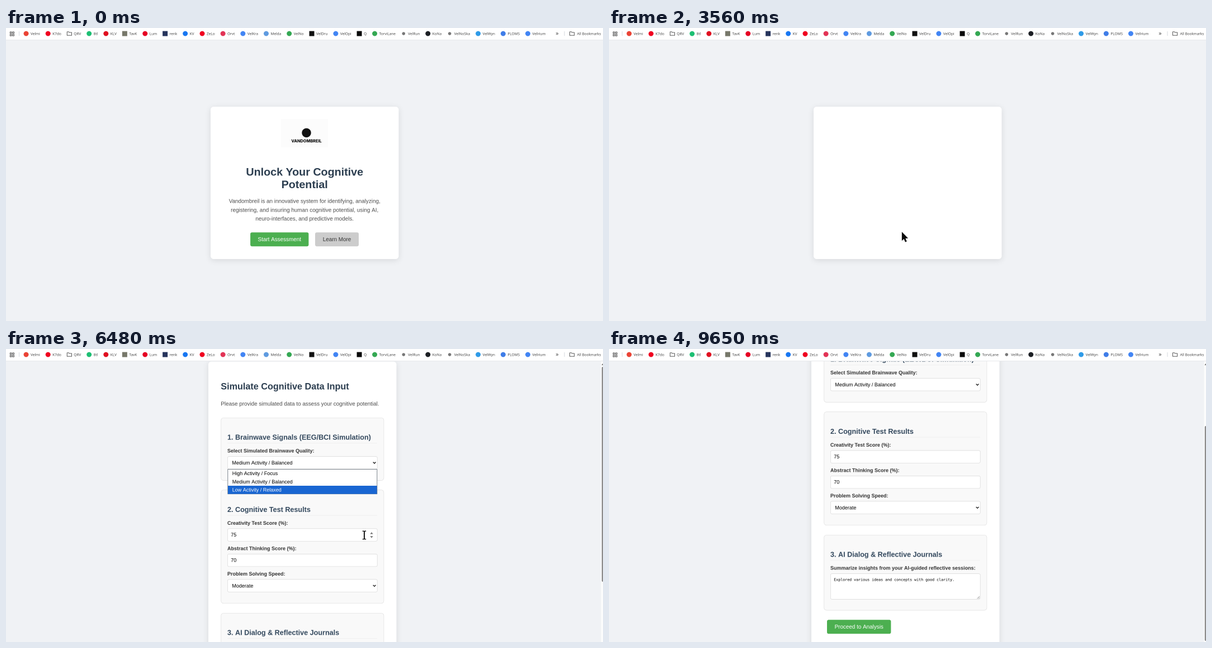
Recreate the animation shown at these times as an HTML page with a canvas. Size 1068x525 px, loop 9850 ms.

```html
<!DOCTYPE html>
<html lang="en">
<head>
<meta charset="utf-8">
<title>Assessment walkthrough</title>
<style>
  html, body { margin: 0; width: 100%; height: 100%; overflow: hidden; background: #f0f2f5; }
  canvas { display: block; width: 1068px; height: 525px; }
</style>
</head>
<body>
<canvas id="stage"></canvas>
<script>
const W = 1068, H = 525, LOOP = 9850, TICK = 68, PHASE = 18;
const SCALE = 2; // drawn large and reduced, which keeps small text unhinted
const canvas = document.getElementById('stage');
canvas.width = W * SCALE;
canvas.height = H * SCALE;
const ctx = canvas.getContext('2d');
ctx.scale(SCALE, SCALE);

const SANS = '"Liberation Sans", Arial, sans-serif';
const MONO = '"DejaVu Sans Mono", monospace';
const UI = '"Open Sans", "Noto Sans", sans-serif';

// Pointer tip: time, x, y
const route = [
  [260, 941, 506], [900, 680, 409], [1240, 525, 380], [2260, 458, 377], [2610, 518, 377],
  [3300, 518, 377], [3560, 524, 365], [4240, 581.5, 263], [4790, 660, 194], [5460, 664, 197],
  [5590, 659, 200], [5870, 659, 201], [6470, 641, 333.5], [7360, 632.5, 337.5],
  [8040, 632.5, 337], [9050, 1030, 526]
];

const bookmarks = [
  ['Velmi', '#ea4335'], ['K7do', '#f00020'], ['QRV', 'folder'], ['8tl', '#1dbf73'],
  ['KLV', '#e01020'], ['TavK', '#77786a', 'square'], ['Lum', '#e60023'], ['renk', '#26345c', 'square'],
  ['KV', '#1877f2'], ['ZeLo', '#f00020'], ['Orvt', '#e23456'], ['VelKra', '#4285f4'],
  ['Melda', '#5f9be0'], ['VelNo', '#34a853'], ['VelDru', '#111', 'square'], ['VelOpi', '#4285f4'],
  ['Q', '#0a0a0a', 'square'], ['TorviLane', '#34a853'], ['VelRun', '#777', 'dot'], ['KoNa', '#1c1f24'],
  ['VelNoSka', '#777', 'dot'], ['VelWyn', '#2f9be8'], ['PLOMS', '#3f7de8'], ['VelHum', '#4285f4']
];

const ramp = (t, a, b) => Math.min(1, Math.max(0, (t - a) / (b - a)));

function mix(a, b, k) {
  return `rgb(${a.map((v, i) => Math.round(v + (b[i] - v) * k))})`;
}

function text(str, x, y, size, color, { bold = 400, align = 'left', font = SANS } = {}) {
  ctx.font = `${bold} ${size}px ${font}`;
  ctx.textAlign = align;
  ctx.fillStyle = color;
  ctx.fillText(str, x, y);
}

function box(x, y, w, h, r, fill, stroke, line = 0.7) {
  ctx.beginPath();
  ctx.roundRect(x, y, w, h, r);
  if (fill) { ctx.fillStyle = fill; ctx.fill(); }
  if (stroke) { ctx.strokeStyle = stroke; ctx.lineWidth = line; ctx.stroke(); }
}

function disc(x, y, r, fill) {
  ctx.beginPath();
  ctx.arc(x, y, r, 0, 7);
  ctx.fillStyle = fill;
  ctx.fill();
}

function poly(points, fill, stroke, line, closed = true) {
  ctx.beginPath();
  points.forEach(([x, y]) => ctx.lineTo(x, y));
  if (closed) ctx.closePath();
  if (stroke) { ctx.strokeStyle = stroke; ctx.lineWidth = line; ctx.lineJoin = 'round'; ctx.stroke(); }
  if (fill) { ctx.fillStyle = fill; ctx.fill(); }
}

function card(x, y, w, h) {
  ctx.save();
  ctx.shadowColor = 'rgba(0,0,0,.1)';
  ctx.shadowBlur = 11 * SCALE;
  ctx.shadowOffsetY = 2.25 * SCALE;
  box(x, y, w, h, 5.5, '#fff');
  ctx.restore();
}

function button(x, y, w, label, fill, color) {
  box(x, y, w, 25, 2.8, fill);
  text(label, x + w / 2, y + 15.9, 9.9, color, { align: 'center' });
}

function folder(x) {
  poly([[x - 4, 6.8], [x - 1, 6.8], [x, 7.9], [x + 4.2, 7.9], [x + 4.2, 13.2], [x - 4, 13.2]], null, '#444', 0.9);
}

function drawBookmarks(first, last) {
  ctx.font = `400 6.5px ${UI}`;
  const widths = bookmarks.map(([name]) => ctx.measureText(name).width);
  const used = widths.slice(0, -1).reduce((sum, w) => sum + w, 0);
  const gap = (last - first - used) / (bookmarks.length - 1);
  let x = first;
  bookmarks.forEach(([name, color, shape], i) => {
    const cx = x - 8;
    if (color === 'folder') folder(cx);
    else if (shape === 'square') box(cx - 4.5, 5.5, 9, 9, 0, color);
    else disc(cx, 10, shape === 'dot' ? 2.8 : 4.5, color);
    text(name, x, 12.4, 6.5, '#3c3c3c', { font: UI });
    x += widths[i] + gap;
  });
}

function drawBar() {
  ctx.fillStyle = '#fff';
  ctx.fillRect(0, 0, W, 21);
  ctx.fillStyle = '#e6e8eb';
  ctx.fillRect(0, 21, W, 1);
  for (const x of [7.3, 11.7])
    for (const y of [7, 11.3]) box(x, y, 2.7, 2.7, 0, null, '#444', 0.9);
  ctx.fillStyle = '#d3d8de';
  ctx.fillRect(23, 6, 1, 8);
  ctx.fillRect(998.5, 6, 1, 8);
  drawBookmarks(44, 941.5);
  text('»', 986, 13.2, 10.5, '#444', { align: 'center', font: UI });
  folder(1012.5);
  text('All Bookmarks', 1064.3, 12.4, 6.4, '#3c3c3c', { align: 'right', font: UI });
}

function drawWelcome(t) {
  card(366, 141, 336.5, 273);
  ctx.globalAlpha = 1 - ramp(t, 3080, 3530);
  const cx = 534.2, title = { bold: 700, align: 'center' };
  box(492, 163, 84, 51, 0, '#fcfcfc');
  disc(537.5, 187.8, 8.2, '#111');
  text('VANDOMBREIL', 537.5, 204.9, 7.3, '#111', { bold: 800, align: 'center', font: 'Inter, sans-serif' });
  text('Unlock Your Cognitive', cx, 264.3, 19.7, '#2c3e50', title);
  text('Potential', cx, 287, 19.7, '#2c3e50', title);
  ['Vandombreil is an innovative system for identifying, analyzing,',
   'registering, and insuring human cognitive potential, using AI,',
   'neuro-interfaces, and predictive models.'
  ].forEach((s, i) => text(s, cx, 313.5 + i * 15.8, 9.9, '#4e4e4e', { align: 'center' }));
  const start = ramp(t, 1160, 1360);
  const learn = ramp(t, 1020, 1160) - ramp(t, 1160, 1400);
  button(437.1, 366.2, 104.3, 'Start Assessment', mix([76, 175, 80], [69, 160, 73], start), '#fff');
  button(553, 366.2, 78, 'Learn More', mix([204, 204, 204], [187, 187, 187], learn), '#333');
  ctx.globalAlpha = 1;
}

function field(y, h = 22.4, ring = false) {
  box(396.4, y, 267.8, h, 2.5, '#fff', ring ? '#101010' : '#d8d8d8', ring ? 1.5 : 0.7);
}

function picker(value, ring) {
  return y => {
    field(y, 22.4, ring);
    text(value, 404.4, y + 14.4, 9, '#000');
    poly([[656.7, y + 10], [659.1, y + 12.4], [661.5, y + 10]], null, '#111', 1.3, false);
  };
}

function numberInput(value, spinner) {
  return y => {
    field(y);
    text(value, 402.2, y + 14.3, 9, '#000');
    if (spinner)
      for (const s of [-1, 1]) {
        const base = y + 11.5 + s * 1.8;
        poly([[651.3, base], [654, base + s * 3.5], [656.7, base]], '#777');
      }
  };
}

function notes(y) {
  field(y, 45.8);
  text('Explored various ideas and concepts with good clarity.', 402.2, y + 12.7, 6.65, '#000', { font: MONO });
  for (const d of [2, 4.5])
    poly([[663 - d, y + 44.8], [663, y + 44.8 - d]], null, '#777', 0.6, false);
}

function section(y, h, title, rows) {
  box(384.7, y, 291.2, h, 4.5, '#f9f9f9', '#e0e0e0');
  text(title, 396, y + 39.4, 12.6, '#34495e', { bold: 700 });
  ctx.fillStyle = '#eee';
  ctx.fillRect(396, y + 45, 268, 0.8);
  rows.forEach(([label, control], i) => {
    const top = y + 62.4 + i * 45.5;
    text(label, 396, top, 9, '#333', { bold: 700 });
    control(top + 6.9);
  });
}

function drawForm(t, tip) {
  const scroll = 140 * (1 - Math.pow(1 - ramp(t, 7630, 8040), 3.13));
  ctx.save();
  ctx.translate(0, -scroll);
  card(362, 22.5, 336.5, 660);
  ctx.globalAlpha = ramp(t, 3600, 4200);
  text('Simulate Cognitive Data Input', 384.3, 72.5, 16.2, '#2c3e50', { bold: 700 });
  text('Please provide simulated data to assess your cognitive potential.', 384.3, 101.5, 9.9, '#4e4e4e');
  section(123.3, 112.2, '1. Brainwave Signals (EEG/BCI Simulation)', [
    ['Select Simulated Brainwave Quality:', picker('Medium Activity / Balanced', t >= 7620 && t < 9600)]
  ]);
  section(252.6, 203.2, '2. Cognitive Test Results', [
    ['Creativity Test Score (%):', numberInput('75', tip.kind === 'beam')],
    ['Abstract Thinking Score (%):', numberInput('70')],
    ['Problem Solving Speed:', picker('Moderate')]
  ]);
  section(473.3, 134.8, '3. AI Dialog & Reflective Journals', [
    ['Summarize insights from your AI-guided reflective sessions:', notes]
  ]);
  button(390, 625.3, 114.4, 'Proceed to Analysis', '#4caf50', '#fff');
  ctx.restore();

  ctx.fillStyle = '#fcfcfc';
  ctx.fillRect(1064.5, 22, 3.5, H);
  box(1065.8, 32 + scroll * 0.757, 5, 385, 2, '#8b8b8b');
  poly([[1065.3, 29], [1068.2, 25.5], [1071, 29]], '#777');
  if (t >= 5590 && t < 7620) drawOptions(tip.y);
}

function drawOptions(y) {
  const top = 215.6, row = 14.7;
  const active = y < top ? 1 : Math.min(2, Math.floor((y - top) / row));
  box(396.8, top, 267, row * 3, 0, '#fff', '#6d7780', 0.9);
  ['High Activity / Focus', 'Medium Activity / Balanced', 'Low Activity / Relaxed'].forEach((s, i) => {
    const ry = top + i * row;
    if (i === active) box(397, ry, 266.6, row, 0, '#1966d2');
    text(s, 404.7, ry + 10.6, 9, i === active ? '#fff' : '#000');
  });
}

function pointer(t) {
  const next = route.findIndex(p => p[0] > t);
  const i = next < 0 ? route.length - 1 : Math.max(1, next);
  const [ta, xa, ya] = route[i - 1], [tb, xb, yb] = route[i];
  const k = ramp(t, ta, tb);
  const x = xa + (xb - xa) * k, y = ya + (yb - ya) * k;
  const overButton = y > 366 && y < 391 && ((x > 437 && x < 541) || (x > 553 && x < 631));
  let kind = 'arrow';
  if (t < 3490 && overButton) kind = 'hand';
  else if (t > 6000 && t < 7960 && y > 322) kind = 'beam';
  return { x, y, kind };
}

const shapes = {
  arrow() {
    poly([[0, 0], [0, 16], [3.7, 12.7], [6.1, 18.3], [8.9, 17.1], [6.5, 11.7], [11.2, 11.5]], '#0a0a0a', '#fff', 1.2);
  },
  hand() {
    poly([[-0.8, 0.2], [0.8, 0.2], [1, 4], [4.6, 5], [5.6, 6], [5.2, 9], [4.2, 12], [-0.2, 12],
          [-2.6, 8], [-2, 7], [-0.8, 8]], '#fff', '#111', 1.5);
  },
  beam() {
    poly([[0, -6.4], [0, 6.4]], null, '#000', 1.8, false);
    for (const s of [-1, 1])
      poly([[-3.2, 7.2 * s], [-0.8, 7.2 * s], [0, 6.4 * s], [0.8, 7.2 * s], [3.2, 7.2 * s]], null, '#000', 1.3, false);
  }
};

function drawPointer(t, tip) {
  if (t < 260 || t >= 9050) return;
  const clicking = (t >= 2870 && t < 3080) || (t >= 5590 && t < 5730);
  if (clicking) disc(tip.x, tip.y, 7, 'rgba(235,215,0,.72)');
  ctx.save();
  ctx.translate(tip.x, tip.y);
  shapes[tip.kind]();
  ctx.restore();
}

function draw(now) {
  // The screen refreshes in even steps
  const t = Math.floor((now % LOOP - PHASE) / TICK) * TICK + PHASE;
  const tip = pointer(t);
  ctx.fillStyle = '#f0f2f5';
  ctx.fillRect(0, 0, W, H);
  if (t < 3620) drawWelcome(t);
  else drawForm(t, tip);
  drawBar();
  drawPointer(t, tip);
}

let origin = null;
function loop(now) {
  if (origin === null) origin = now;
  draw(now - origin);
  requestAnimationFrame(loop);
}
draw(0);
requestAnimationFrame(loop);
</script>
</body>
</html>
```
